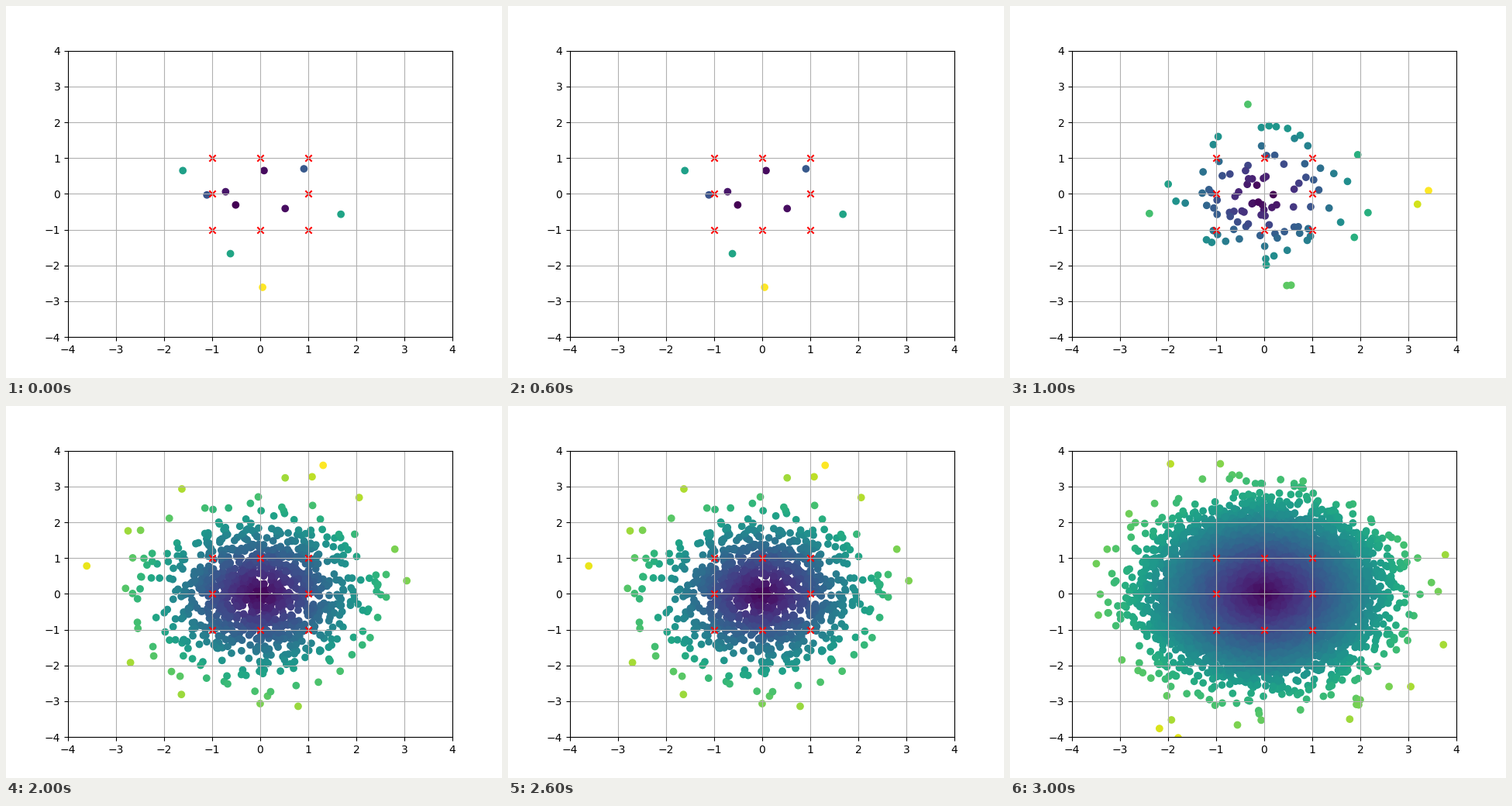
Recreate the animation shown at these times as a matplotlib script. Size 640 by 480 pixels, loop 4 s.

```python
import itertools

import matplotlib.pyplot as plt
import numpy as np
from matplotlib.animation import FuncAnimation

SMALL_SAMPLE = [
    (-1.61, .65), (-1.11, -.03), (-.72, .06), (-.51, -.31), (.08, .65),
    (.91, .70), (.52, -.41), (1.68, -.57), (-.62, -1.67), (.05, -2.61),
]


def normal_sample(size, radius, extremes, seed):
    """Standard normal points inside the radius, plus a few far ones."""
    rng = np.random.default_rng(seed)
    draws = rng.standard_normal((size * 2, 2))
    inner = draws[np.hypot(*draws.T) < radius][:size - len(extremes)]
    return rng.permutation(np.vstack([extremes, inner]))


samples = [
    np.array(SMALL_SAMPLE),
    normal_sample(100, 2.5, [
        (3.42, .09), (3.19, -.29), (-.34, 2.5), (.47, -2.56), (.56, -2.55),
    ], seed=5),
    normal_sample(1000, 3.1, [
        (1.31, 3.59), (1.08, 3.27), (.52, 3.24), (-3.61, .78),
        (2.06, 2.69), (-1.63, 2.93), (-2.75, 1.76), (-2.7, -1.92),
        (-1.64, -2.81), (.79, -3.14),
    ], seed=6),
    # The last point lies below the axes but still sets the colour range.
    normal_sample(10000, 3.75, [
        (-1.95, 3.63), (3.77, 1.09), (3.73, -1.42), (3.05, -2.59),
        (1.78, -3.5), (-1.93, -3.52), (-2.18, -3.76), (-1.79, -4.02),
        (-1.2, -4.45),
    ], seed=7),
]
ring = np.array([p for p in itertools.product((-1, 0, 1), repeat=2) if any(p)])

fig, ax = plt.subplots(figsize=(6.4, 4.8), dpi=100)


def draw(frame):
    points = samples[frame]
    ax.clear()
    ax.scatter(*points.T, c=np.hypot(*points.T), cmap="viridis")
    ax.scatter(*ring.T, c="red", marker="x")
    ax.set(xlim=(-4, 4), ylim=(-4, 4))
    ax.grid(True)


anim = FuncAnimation(fig, draw, frames=len(samples), interval=1000, repeat=True)
plt.show()
```
